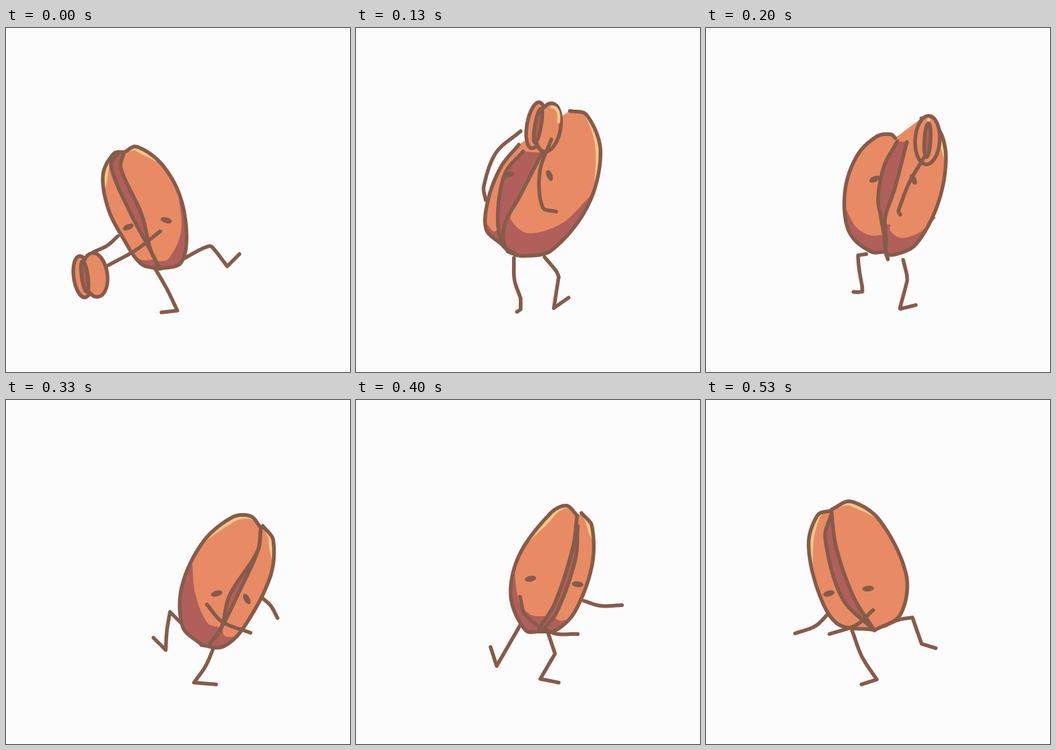
An HTML page for the animation above (600 ms loop, 560 px wide and 560 px high).

```html
<!DOCTYPE html>
<html lang="en">
<head>
<meta charset="utf-8">
<title>Bean throw</title>
<style>
  html, body { margin: 0; width: 100%; height: 100%; overflow: hidden; background: #fcfcfc; }
  svg { display: block; width: 100vw; height: 100vh; }
</style>
</head>
<body>
<svg id="stage" viewBox="0 0 560 560" fill="none" stroke-linecap="round" stroke-linejoin="round"></svg>
<script>
const INK = '#875b4a', SKIN = '#e88b64', DARK = '#b05f5a', GLOW = '#f1c788';
const LOOP = 600, SAMPLES = 64;

// Key points of smooth curves, "!" marks a corner. Each lobe has an outer edge,
// a groove edge, the upper border of its shade and the lit span of its outer edge.
// Eyes are x, y, angle; arms run from shoulder to hand, legs from hip to toe.
const windUp = {
  left: {
    edge: '193 202 176 204 158 238 166 293 190 341 220 384 250 392',
    groove: '184 202 171 224 200 296 233 358 250 391',
    shade: '212 374 224 378 240 377', lit: [.13, .33]
  },
  right: {
    edge: '193 202 212 193 252 220 283 273 294 340 284 383 250 392',
    groove: '192 202 187 228 221 304 235 360 250 391',
    shade: '279 258 285 330 264 376 243 380', lit: [.02, .24]
  },
  eyes: [[199, 324, -25], [261, 313, 15]],
  near: '251 331 212 361 167 386', far: '182 339 165 354 142 365',
  legs: ['243 392 262 425 279 460! 253 463', '288 376 331 355 341 363 360 388! 380 368'],
  pip: { x: 145, y: 402, tilt: -8, side: -1, tall: 36, shine: 0 }
};

const overhead = {
  left: {
    edge: '265 190 236 226 215 280 212 328 238 353',
    groove: '272 201 243 236 231 300 238 352 262 370',
    shade: '214 320 224 331 232 328'
  },
  right: {
    edge: '348 135 375 141 398 200 378 288 318 362 270 371 247 364',
    groove: '303 203 266 275 242 320 243 358 262 370',
    shade: '379 276 335 318 280 334 252 312 256 293', lit: [.08, .42]
  },
  eyes: [[248, 239, -15], [315, 240, 68]],
  near: '326 299 304 292 299 235 318 181', far: '211 280 208 258 228 203 268 168',
  legs: ['257 374 258 410 268 440! 268 458! 262 462', '307 373 326 396 330 405! 322 456! 346 439'],
  pip: { x: 313, y: 162, tilt: 10, side: -1, tall: 40, shine: 1 }
};

const release = {
  left: {
    edge: '351 168 343 148 310 142 261 180 236 255 252 340 312 385 340 376',
    groove: '351 168 336 215 328 275 338 303 346 345 330 383',
    shade: '238 262 270 322 312 345 345 345', lit: [.07, .33]
  },
  right: {
    edge: '353 159 379 185 381 272 366 348 340 376',
    groove: '351 168 346 250 338 303 346 345 330 383',
    shade: '369 342 356 349 345 347', lit: [.03, .17]
  },
  eyes: [[301, 253, -35], [360, 253, 60]],
  near: '307 309 340 299 381 267', far: '373 304 398 297 418 272',
  legs: ['265 362 238 342! 241 412! 218 397', '335 382 324 420 309 458! 337 463'],
  pip: { x: 396, y: 231, tilt: -3, side: 1, tall: 39, shine: 1 }
};

const follow = {
  left: {
    edge: '415 208 398 189 368 191 320 232 286 305 288 370 318 398',
    groove: '415 208 410 245 364 318 350 372 332 396',
    shade: '303 262 308 315 328 363 351 371', lit: [.05, .37]
  },
  right: {
    edge: '418 205 435 228 430 288 385 373 352 402 318 399',
    groove: '415 208 410 245 382 307 350 372 332 396',
    shade: '379 385 356 384 352 367', lit: [.03, .24]
  },
  eyes: [[343, 315, -15], [392, 324, 60]],
  near: '327 333 352 361 398 379', far: '417 322 431 335 442 355',
  legs: ['299 377 267 345! 262 375 260 407! 240 387', '338 403 325 433 306 460! 342 463']
};

const recoil = {
  left: {
    edge: '360 188 343 172 318 183 266 252 252 320 276 375 300 377',
    groove: '360 188 353 240 324 330 298 372',
    shade: '257 270 266 330 285 350 308 352', lit: [.06, .38]
  },
  right: {
    edge: '367 184 384 205 384 270 356 345 325 375 300 377',
    groove: '361 205 357 260 327 345 302 377',
    shade: '347 357 331 359 321 352', lit: [.03, .2]
  },
  eyes: [[284, 291, -10], [361, 300, 5]],
  near: '267 320 276 350 320 379 361 381', far: '371 327 398 335 433 334',
  legs: ['267 367 229 433! 219 402', '313 380 324 413! 300 454! 330 460']
};

const turn = {
  left: {
    edge: '204 180 182 187 167 235 184 315 215 365 272 374',
    groove: '203 188 194 225 222 323 274 375', lit: [.05, .4]
  },
  right: {
    edge: '205 178 235 165 282 195 326 285 316 350 274 375',
    groove: '204 180 212 240 240 320 274 375', lit: [.03, .26]
  },
  eyes: [[200, 315, -15], [264, 307, -5]],
  near: '272 342 245 366 201 381', far: '198 349 178 368 145 380',
  legs: ['238 376 254 418 278 455! 253 463', '290 368 313 358 336 354! 351 397! 374 404']
};

const dist = (a, b) => Math.hypot(a[0] - b[0], a[1] - b[1]);

// Chord-length spline through the key points, sampled at even steps.
function curve(text) {
  const marks = [...text.matchAll(/(\d+) (\d+)(!?)/g)];
  const pts = marks.map(m => [+m[1], +m[2]]);
  const last = pts.length - 1;
  const hard = i => i === 0 || i === last || marks[i][3] === '!';
  const at = [0];
  for (let i = 1; i <= last; i++) at.push(at[i - 1] + dist(pts[i], pts[i - 1]));

  const slope = (i, seg, k) => {
    const [a, b] = hard(i) ? [seg, seg + 1] : [i - 1, i + 1];
    return (pts[b][k] - pts[a][k]) / (at[b] - at[a]);
  };
  const step = at[last] / SAMPLES;
  return Array.from({ length: SAMPLES + 1 }, (_, j) => {
    let s = j * step;
    let i = 0;
    while (i < last - 1 && at[i + 1] <= s) i++;
    if (hard(i) && s - at[i] < step) s = at[i];
    const d = at[i + 1] - at[i], t = (s - at[i]) / d, u = 1 - t;
    return [0, 1].map(k =>
      u * u * (1 + 2 * t) * pts[i][k] + t * t * (3 - 2 * t) * pts[i + 1][k] +
      d * t * u * (u * slope(i, i, k) - t * slope(i + 1, i, k)));
  });
}

// Applies fn to every leaf of a pose.
function mapTree(node, fn) {
  if (typeof node !== 'object') return fn(node);
  if (Array.isArray(node)) return node.map(v => mapTree(v, fn));
  return Object.fromEntries(Object.entries(node).map(([k, v]) => [k, mapTree(v, fn)]));
}
const build = pose => mapTree(pose, v => typeof v === 'string' ? curve(v) : v);

// Halfway between two poses, keeping the parts both have.
function between(a, b) {
  if (typeof a === 'number') return (a + b) / 2;
  if (Array.isArray(a)) return a.map((v, i) => between(v, b[i]));
  return Object.fromEntries(Object.keys(a).filter(k => k in b).map(k => [k, between(a[k], b[k])]));
}

// Carries the small bean and both hands outwards along the throwing arc.
function swing(pose, dx, dy) {
  const pull = pts => pts.map(([x, y], i) => [x + dx * i / SAMPLES, y + dy * i / SAMPLES]);
  const { near, far, pip } = pose;
  return { ...pose, near: pull(near), far: pull(far), pip: { ...pip, x: pip.x + dx, y: pip.y + dy } };
}

const trace = pts => 'M' + pts.map(p => p.map(v => v.toFixed(1)).join(' ')).join('L');
const area = (pts, color) => `<path d="${trace(pts)}Z" fill="${color}"/>`;
const line = pts => `<path d="${trace(pts)}" stroke="${INK}" stroke-width="6"/>`;
const ring = (a, b) => [...a, ...[...b].reverse()];
const oval = (x, rx, ry, fill) =>
  `<ellipse cx="${x}" rx="${rx}" ry="${ry}" fill="${fill}" stroke="${INK}" stroke-width="6"/>`;
const eye = ([x, y, angle]) =>
  `<ellipse rx="9.5" ry="4.7" fill="${INK}" transform="translate(${x} ${y}) rotate(${angle})"/>`;

// The part of a lobe below the border of its shade.
function shade(lobe) {
  if (!lobe.shade) return '';
  const rim = ring(lobe.edge, lobe.groove);
  const nearest = p => rim.reduce((best, q, i) => dist(p, q) < dist(p, rim[best]) ? i : best, 0);
  const from = nearest(lobe.shade[0]), to = nearest(lobe.shade[SAMPLES]);
  return area(ring(rim.slice(from, to + 1), lobe.shade), DARK);
}

// A tapered band of light along the inside of the outer edge.
function light(lobe, side) {
  if (!lobe.lit) return '';
  const [from, to] = lobe.lit.map(v => Math.round(v * SAMPLES));
  const outer = lobe.edge.slice(from, to + 1);
  const inner = outer.map(([x, y], i) => {
    const a = lobe.edge[Math.max(0, from + i - 1)], b = lobe.edge[from + i + 1];
    const w = side * (3 + 5 * Math.sin(Math.PI * i / (to - from))) / dist(a, b);
    return [x + w * (b[1] - a[1]), y - w * (b[0] - a[0])];
  });
  return area(ring(outer, inner), GLOW);
}

const body = ({ left, right }) =>
  area(ring(left.edge, right.edge), SKIN) + shade(left) + shade(right) +
  area(ring(left.groove, right.groove), DARK) + light(left, 1) + light(right, -1) +
  [left.edge, right.edge, left.groove, right.groove].map(line).join('');

// Small bean: a back lobe on one side, a front lobe and the groove between them.
function smallBean(pip) {
  if (!pip) return '';
  const { x, y, tilt, side, tall, shine } = pip;
  return `<g transform="translate(${x} ${y}) rotate(${tilt})">` +
    oval(side * 21, 14, tall - 2, SKIN) + oval(0, 20, tall, SKIN) +
    `<path d="M0 ${6 - tall}Q${-side * 13} ${4 - tall} ${-side * 15} -12" stroke="${GLOW}" stroke-width="${5 * shine}"/>` +
    oval(side * 17, 5, tall * .7, DARK) + '</g>';
}

const draw = p =>
  p.legs.map(line).join('') + line(p.far) + body(p) +
  p.eyes.map(eye).join('') + smallBean(p.pip) + line(p.near);

const [p0, p1, p2, p3, p4, p5] = [windUp, overhead, release, follow, recoil, turn].map(build);
const steps = [
  [0, p0], [60, swing(between(p0, p1), -55, -30)], [130, p1], [200, swing(between(p1, p2), 6, -14)],
  [260, p2], [330, p3], [400, p4], [460, between(p4, p5)], [530, p5]
].map(([at, pose]) => ({ at, art: draw(pose) }));

const stage = document.getElementById('stage');
let shown;
function render(ms) {
  const step = steps.findLast(s => s.at <= ms % LOOP);
  if (step !== shown) stage.innerHTML = (shown = step).art;
}
function tick() {
  render(performance.now());
  requestAnimationFrame(tick);
}
tick();
</script>
</body>
</html>
```
